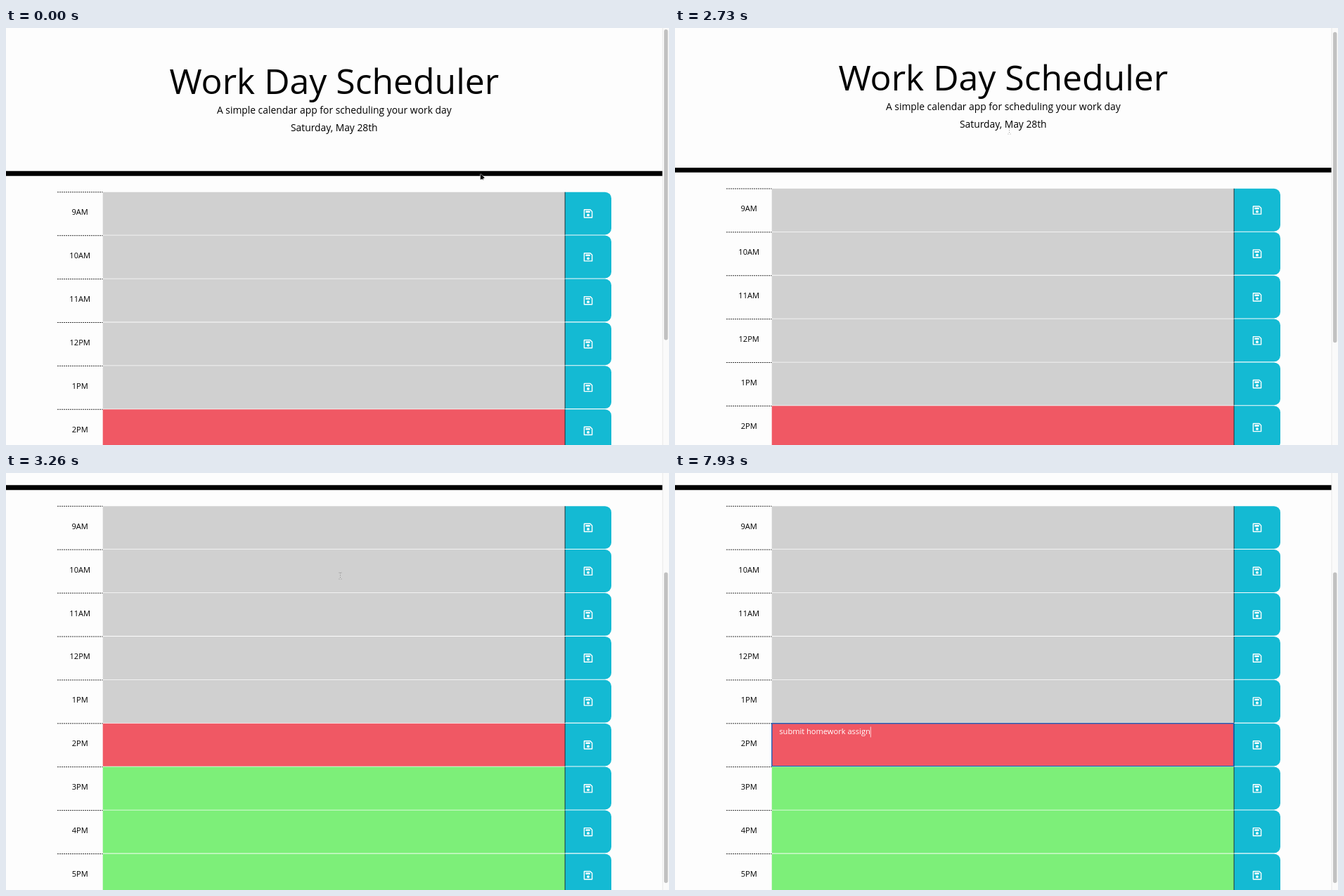
These frames come from a looping animation (943 px wide and 594 px high, 8 s). An HTML page with a canvas:

```html
<!DOCTYPE html>
<html lang="en">
<head>
<meta charset="utf-8">
<title>Work Day Scheduler</title>
<style>
  html, body { margin: 0; width: 100%; height: 100%; overflow: hidden; background: #fdfdfd; }
  canvas { display: block; }
</style>
</head>
<body>
<canvas id="stage" width="943" height="594"></canvas>
<script>
const ctx = document.getElementById('stage').getContext('2d');
const LOOP = 8000, FPS = 15;
const PAPER = '#fdfdfd', GRAY = '#d0d0d0', RED = '#f05864', GREEN = '#7def79', TEAL = '#14bad3';
const REM = 11.08, LEAD = REM * 1.25, TITLE = REM * 4.5;
const MID = 466.8, FIRST_ROW = 233.4, PITCH = 61.9, SCROLL_END = 186.5;
const HOURS = ['9AM', '10AM', '11AM', '12PM', '1PM', '2PM', '3PM', '4PM', '5PM'];
const NOW = 5, DATE = 'Saturday, May 28th', NOTE = 'submit homework assign';

// Steps of 1/15 s at which the user acts
const SELECT = 14, DESELECT = 37, FOCUS = 68, TYPE = 86;
const START = { x: 675, y: 208 };
const MOVES = [
  { from: 0, to: 13, x: 529, y: 143 },
  { from: SELECT - 1, to: 24, x: 405, y: 147 },
  { from: 31, to: 36, x: 475.5, y: 146.5 },
  { from: 54, to: 67, x: 315, y: 392 },
];

const ramp = (step, from, to) => Math.min(1, Math.max(0, (step - from) / (to - from)));
const smooth = u => u * u * (3 - 2 * u);

const scrollAt = step => SCROLL_END * smooth(ramp(step, 38, 49) ** 1.8);

// Two bursts of even typing with a short pause between them
const typedAt = step => Math.round(8 * ramp(step, TYPE - 1, 96) + 14 * ramp(step, 100, 119));

const pointerAt = step => MOVES.reduce((p, move) => {
  const u = smooth(ramp(step, move.from, move.to));
  return { x: p.x + (move.x - p.x) * u, y: p.y + (move.y - p.y) * u };
}, START);

function rect(color, x, y, w, h, radius = 0) {
  ctx.fillStyle = color;
  ctx.beginPath();
  ctx.roundRect(x, y, w, h, radius);
  ctx.fill();
}

function text(str, x, y, size, color = '#000', align = 'center') {
  ctx.font = `${size}px "Open Sans", "Noto Sans", sans-serif`;
  ctx.textAlign = align;
  ctx.fillStyle = color;
  ctx.fillText(str, x, y);
  return ctx.measureText(str).width;
}

function line(color, width, ...points) {
  ctx.strokeStyle = color;
  ctx.lineWidth = width;
  ctx.beginPath();
  points.forEach(([x, y]) => ctx.lineTo(x, y));
  ctx.stroke();
}

function header(top, step, pointerX) {
  text('Work Day Scheduler', MID, top + 94, TITLE);
  text('A simple calendar app for scheduling your work day', MID, top + 122, LEAD);
  const width = text(DATE, MID, top + 147, LEAD);
  if (step >= SELECT && step < DESELECT) {
    const left = Math.max(pointerX, MID - width / 2);
    rect('#dcbfdf', left, top + 132.5, MID + width / 2 - left, 18.7);
    text(DATE, MID, top + 147, LEAD);
  }
  rect('#000', 0, top + 203.8, 934, 6.9);
}

function saveIcon(x, y) {
  ctx.save();
  ctx.translate(x, y);
  ctx.lineJoin = 'round';
  const r = 5.6, cut = 3;
  line('#fff', 1.4, [0, -r], [cut, -r], [r, -cut], [r, r], [-r, r], [-r, -r], [0, -r]);
  rect('#fff', -3.6, -3.8, 6.4, 2.4, 0.4);
  rect('#fff', -1.9, 0.1, 3.8, 3.8, 1.9);
  ctx.restore();
}

function row(i, top, step) {
  const y = top + FIRST_ROW + PITCH * i;
  const fill = i < NOW ? GRAY : i === NOW ? RED : GREEN;
  ctx.setLineDash([2, 1]);
  line('#333', 1, [73, y + 0.4], [137.5, y + 0.4]);
  ctx.setLineDash([]);
  text(HOURS[i], 105.2, y + 32.8, REM);
  rect(fill, 137.7, y + 0.3, 657.3, PITCH - 0.8);
  rect(TEAL, 795, y + 0.3, 66, PITCH - 1.1, [0, 9, 9, 0]);
  rect('#23343a', 794.6, y + 0.3, 1, PITCH - 0.8);
  saveIcon(828, y + 31);
  if (i === NOW && step >= FOCUS) note(y, step);
}

function note(y, step) {
  ctx.strokeStyle = '#1b5fbb';
  ctx.lineWidth = 1.4;
  ctx.strokeRect(137.8, y + 0.3, 656.8, PITCH - 0.9);
  const width = text(NOTE.slice(0, typedAt(step)), 148.3, y + 16, REM, '#fff', 'left');
  const blinkOn = (step - FOCUS) % 14 < 6;
  if (blinkOn || step >= TYPE) rect('#fbd3d6', 148.3 + width, y + 5, 1, 15);
}

function scrollbar(offset) {
  rect('#fafafa', 934, 0, 9, 594);
  rect('#e8e8e8', 933.5, 0, 1, 594);
  rect('#c1c1c1', 936, 2 + offset * 0.748, 5.4, 442.5, 2.7);
}

function arrow({ x, y }) {
  const head = [[x, y], [x, y + 7.6], [x + 5.4, y + 5.4], [x, y]];
  const tail = [[x + 1.5, y + 4], [x + 3.6, y + 8.4]];
  for (const [color, width] of [['#fff', 2.6], ['#111', 1]]) {
    line(color, width, ...tail);
    line(color, width / 2, ...head);
    ctx.fillStyle = '#111';
    ctx.fill();
  }
}

function beam({ x, y }, onRed) {
  const color = onRed ? '#fbe4e6' : '#777';
  if (!onRed) ctx.setLineDash([1, 2]);
  line(color, 0.8, [x, y - 4.5], [x, y + 4.5]);
  for (const end of [y - 4.5, y + 4.5]) line(color, 0.7, [x - 2, end], [x + 2, end]);
  ctx.setLineDash([]);
}

function draw(step) {
  const offset = scrollAt(step), pointer = pointerAt(step);
  rect(PAPER, 0, 0, 943, 594);
  header(-offset, step, pointer.x);
  HOURS.forEach((_, i) => row(i, -offset, step));
  scrollbar(offset);
  if (step >= TYPE) return;
  if (step < SELECT && pointer.y > 152) arrow(pointer);
  else beam(pointer, pointer.y > FIRST_ROW + PITCH * NOW - offset);
}

function tick() {
  const time = performance.now() % LOOP;
  draw(Math.floor((time + 8) * FPS / 1000) % (LOOP * FPS / 1000));
  requestAnimationFrame(tick);
}
tick();
</script>
</body>
</html>
```
